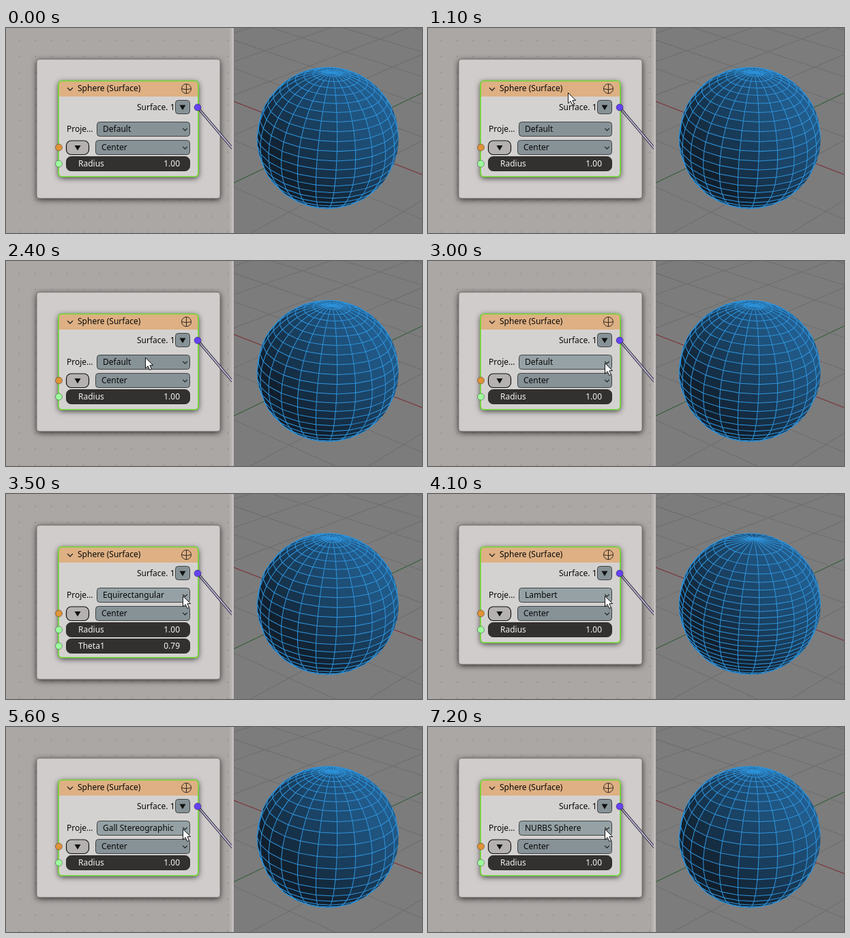
Animation of 610 by 302 pixels, one loop 8 s. Source, as an HTML page with a canvas:

```html
<!DOCTYPE html>
<html lang="en">
<head>
<meta charset="utf-8">
<style>
  html, body { margin: 0; width: 610px; height: 302px; overflow: hidden; }
  canvas { display: block; }
</style>
</head>
<body>
<canvas id="stage" width="610" height="302"></canvas>
<script>
const ctx = document.getElementById('stage').getContext('2d');
const TAU = Math.PI * 2;
const LOOP = 8000;
const SANS = '12px "Noto Sans", sans-serif';
const MONO = '11.63px "DejaVu Sans Mono", monospace';

// Pointer positions, each held until the next: time, x, y
const pointer = [
  [100, 530, 47], [700, 510, 50], [800, 437, 61], [900, 334, 76],
  [1000, 248, 89], [1100, 205, 95], [1200, 191, 97], [1800, 186, 109],
  [2400, 204, 142], [2500, 170, 148], [2600, 146, 151], [2700, 172, 150],
  [2800, 214, 150], [2900, 246, 150], [3000, 259, 150]
];

// Latitude as a function of v in -1..1
const even = v => v * Math.PI / 2;
const equalArea = v => Math.asin(v);
const stereographic = v => 2 * Math.atan(v);
const modes = [
  [0, 'Default', even],
  [3500, 'Equirectangular', even],
  [4100, 'Lambert', equalArea],
  [5600, 'Gall Stereographic', stereographic],
  [7200, 'NURBS Sphere', stereographic]
];

const latest = (list, t) => list.filter(item => item[0] <= t).pop();

function trace(points) {
  ctx.beginPath();
  points.forEach(([x, y]) => ctx.lineTo(x, y));
}

function line(points, color, width = 1) {
  trace(points);
  ctx.strokeStyle = color;
  ctx.lineWidth = width;
  ctx.stroke();
}

function box(x, y, w, h, r, fill, stroke, width = 1) {
  ctx.beginPath();
  ctx.roundRect(x, y, w, h, r);
  ctx.fillStyle = fill;
  ctx.fill();
  if (stroke) {
    ctx.strokeStyle = stroke;
    ctx.lineWidth = width;
    ctx.stroke();
  }
}

function shadowed(blur, draw) {
  ctx.save();
  ctx.shadowColor = 'rgba(0,0,0,.75)';
  ctx.shadowBlur = blur;
  ctx.shadowOffsetY = 2;
  draw();
  ctx.restore();
}

function text(string, x, y, color = '#080808', align = 'left', font = SANS) {
  ctx.font = font;
  ctx.textAlign = align;
  ctx.fillStyle = color;
  ctx.fillText(string, x, y);
}

// Camera: azimuth, elevation, distance
const AZ = 0.65, EL = 0.437, DIST = 14;
const FOCAL = 104 * Math.sqrt(DIST * DIST - 1);

function view([x, y, z]) {
  const near = x * Math.sin(AZ) - y * Math.cos(AZ);
  return [
    x * Math.cos(AZ) + y * Math.sin(AZ),
    near * Math.sin(EL) - z * Math.cos(EL),
    near * Math.cos(EL) + z * Math.sin(EL)
  ];
}

function project(point) {
  const [x, y, depth] = view(point);
  const scale = FOCAL / (DIST - depth);
  return [x * scale, y * scale];
}

function drawFloor() {
  const size = 8;
  for (let i = -size; i <= size; i++) {
    line([project([-size, i, 0]), project([size, i, 0])], i ? '#6d6d6d' : '#7b3238');
    line([project([i, -size, 0]), project([i, size, 0])], i ? '#6d6d6d' : '#365f3a');
  }
}

function drawSphere(latitude) {
  const n = 24;
  const at = (i, j) => {
    const lat = latitude(j / n * 2 - 1), lon = i / n * TAU;
    return [Math.cos(lat) * Math.cos(lon), Math.cos(lat) * Math.sin(lon), Math.sin(lat)];
  };
  const edges = [];
  for (let j = 0; j < n; j++) {
    for (let i = 0; i < n; i++) {
      const [x, y, depth] = view(at(i + 0.5, j + 0.5));
      if (depth < 1 / DIST - 0.04) continue;
      const light = Math.max(0, (x * 0.62 - y * 0.62 + depth * 0.3 + 0.4) / 1.4);
      const corners = [at(i, j), at(i + 1, j), at(i + 1, j + 1), at(i, j + 1)].map(project);
      trace(corners);
      ctx.fillStyle = `rgb(${17 + 18 * light},${31 + 68 * light},${45 + 106 * light})`;
      ctx.fill();
      edges.push([corners[3], corners[0], corners[1]]);
    }
  }
  edges.forEach(edge => line(edge, '#2d93dc'));
}

function drawViewport(latitude) {
  ctx.save();
  ctx.beginPath();
  ctx.rect(334, 0, 276, 302);
  ctx.clip();
  ctx.fillStyle = '#7c7c7c';
  ctx.fillRect(334, 0, 276, 302);
  ctx.translate(472, 162);
  ctx.rotate(0.061);
  drawFloor();
  drawSphere(latitude);
  ctx.restore();
}

function socket(x, y, color) {
  ctx.beginPath();
  ctx.arc(x, y, 5, 0, TAU);
  ctx.fillStyle = color;
  ctx.fill();
  ctx.strokeStyle = 'rgba(0,0,0,.45)';
  ctx.lineWidth = 0.8;
  ctx.stroke();
}

function triangle(x, y) {
  trace([[x - 4.5, y - 3.5], [x + 4.5, y - 3.5], [x, y + 4]]);
  ctx.fillStyle = '#111';
  ctx.fill();
}

const chevron = (x, y, s) => line([[x - s, y - s / 2], [x, y + s / 2], [x + s, y - s / 2]], '#222', 1.3);

function dropdown(x, y, label, fill) {
  box(x + 0.5, y + 0.5, 269 - x, 21, 4, fill, '#3d4243');
  text(label, x + 9, y + 15);
  chevron(262.5, y + 11.5, 3.2);
}

function slider(y, label, value) {
  box(88.5, y + 0.5, 181, 21, 7, '#323130', '#2a2928');
  text(label, 106, y + 15, '#f4f4f4');
  text(value, 255, y + 15, '#f4f4f4', 'right');
  socket(77.5, y + 11, '#9dfb9d');
}

function drawNode(label, tall, hover) {
  const extra = tall ? 22 : 0;
  shadowed(9, () => box(45, 46, 269, 205 + extra, 4, '#d0cccb'));
  box(45, 46, 269, 205 + extra, 4, '#d0cccb', '#75706e', 0.9);

  ctx.lineCap = 'round';
  line([[281, 117], [336, 182]], '#2d2a36', 3.6);
  line([[281, 117], [336, 182]], '#c6c0e2', 1.7);
  ctx.lineCap = 'butt';

  shadowed(8, () => box(77, 78, 205, 141 + extra, 5, '#d4d2d1'));
  box(77, 78, 205, 23, [5, 5, 0, 0], '#deb083');
  box(77, 78, 205, 141 + extra, 5, 'transparent', '#70da31', 1.7);

  chevron(94, 90, 4);
  text('Sphere (Surface)', 105, 93);
  ctx.beginPath();
  ctx.arc(264.5, 89.5, 7, 0, TAU);
  ctx.moveTo(264.5, 82.5);
  ctx.lineTo(264.5, 96.5);
  ctx.moveTo(257.5, 89.5);
  ctx.quadraticCurveTo(264.5, 92, 271.5, 89.5);
  ctx.strokeStyle = '#332a22';
  ctx.lineWidth = 1;
  ctx.stroke();

  text('Surface. 1', 192, 121);
  box(248.5, 106.5, 21, 20, 4, '#879297', '#3d4243');
  triangle(259, 117);
  socket(281, 117, '#6542f2');

  text('Proje…', 89, 153);
  dropdown(133, 138, label, hover ? '#95a1a5' : '#879297');
  box(88.5, 166, 33, 20.5, 7, '#b4b1b0', '#111', 1.2);
  triangle(105, 176.5);
  socket(77.5, 176, '#df9238');
  dropdown(131, 165, 'Center', '#879297');
  slider(189, 'Radius', '1.00');
  if (tall) slider(213, 'Theta1', '0.79');
}

function drawEditor(label, tall, hover) {
  ctx.save();
  ctx.beginPath();
  ctx.rect(0, 0, 331, 302);
  ctx.clip();
  ctx.fillStyle = '#aba7a5';
  ctx.fillRect(0, 0, 334, 302);
  ctx.fillStyle = '#989492';
  for (let x = 18.5; x < 328; x += 23.5)
    for (let y = 17.5; y < 302; y += 23.5) ctx.fillRect(x, y, 2, 2);
  ctx.fillStyle = '#b5b1af';
  ctx.fillRect(328, 0, 3, 302);
  drawNode(label, tall, hover);
  ctx.restore();
  ctx.fillStyle = '#c2bebd';
  ctx.fillRect(331, 0, 3, 302);
}

function drawTooltip() {
  shadowed(5, () => box(229.5, 171.5, 390, 66, 4, 'rgba(250,232,203,.94)'));
  box(229.5, 171.5, 390, 66, 4, 'transparent', '#b5a892', 0.8);
  text('Based on spherical coordinates', 242, 192, '#1c1a18');
  text('Python: SvExSphereNode.projection', 242, 211, '#77716a', 'left', MONO);
  text('bpy.data.node_groups["Sverchok Nodes"].nodes["Sphere', 242, 225, '#77716a', 'left', MONO);
}

function drawPointer(x, y) {
  ctx.save();
  ctx.translate(x + 0.5, y + 0.5);
  trace([[0, 0], [0, 15.5], [3.6, 12.2], [6.3, 18], [9, 16.8], [6.4, 11.2], [11.2, 11]]);
  ctx.closePath();
  ctx.fillStyle = '#fff';
  ctx.fill();
  ctx.strokeStyle = '#111';
  ctx.lineWidth = 1;
  ctx.stroke();
  ctx.restore();
}

function draw(now) {
  const t = now % LOOP;
  const [, label, latitude] = latest(modes, t);
  const cursor = latest(pointer, t);
  drawViewport(latitude);
  drawEditor(label, label === 'Equirectangular', t >= 2500);
  if (t >= 3100 && t < 3500) drawTooltip();
  if (cursor) drawPointer(cursor[1], cursor[2]);
  requestAnimationFrame(draw);
}
requestAnimationFrame(draw);
</script>
</body>
</html>
```
